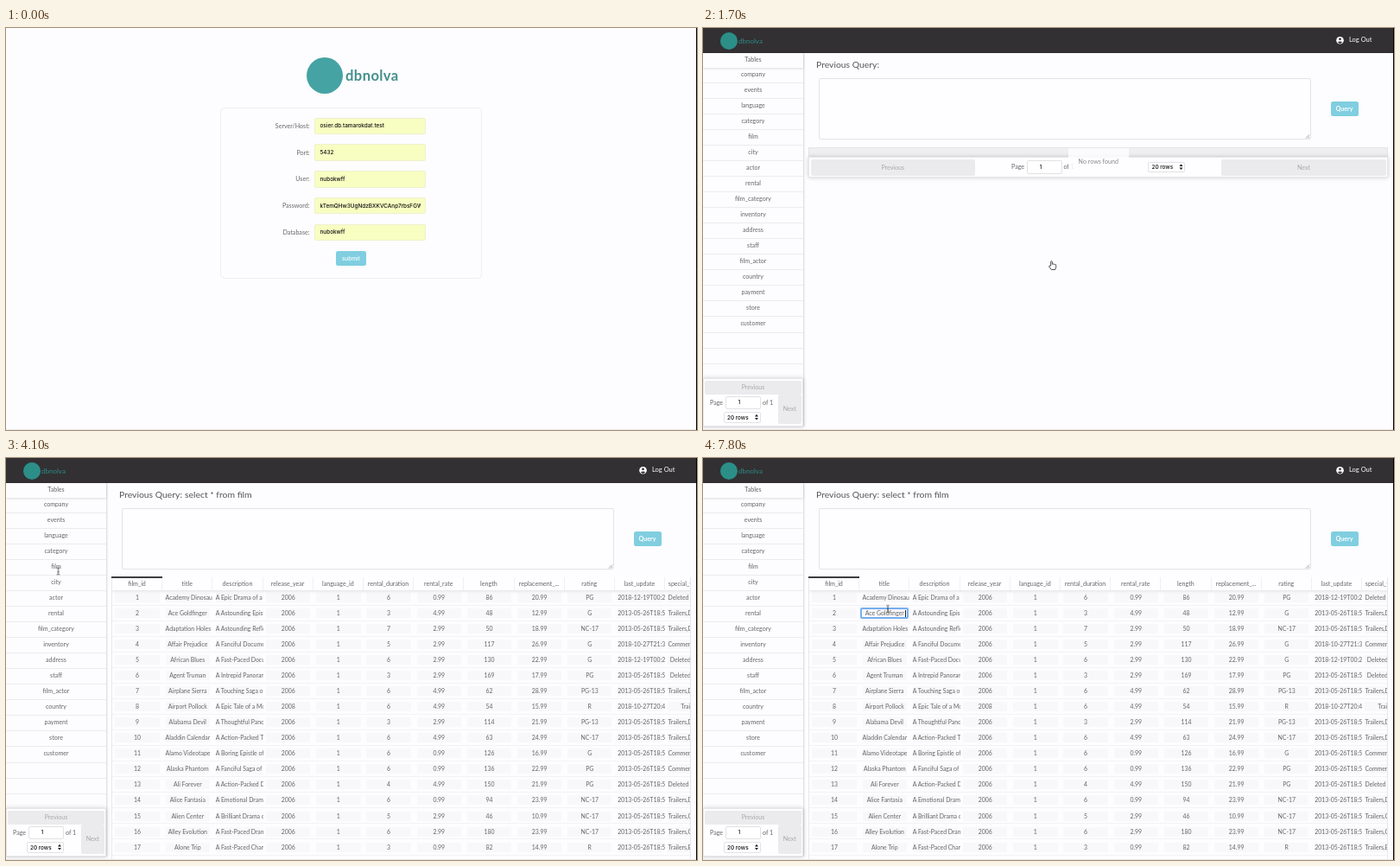
Animation of 800x465 px, one loop 8000 ms. Source, as an HTML page:

```html
<!DOCTYPE html>
<html lang="en">
<head>
<meta charset="utf-8">
<title>Database browser</title>
<style>
html, body { margin: 0; width: 100%; height: 100%; overflow: hidden; background: #fdfcfe; }
#stage { position: absolute; left: 0; top: 0; width: 800px; height: 465px; overflow: hidden; color: #666; font: 7.1px Lato, sans-serif; }
#stage div { position: absolute; box-sizing: border-box; white-space: nowrap; }
#stage .mid { text-align: center; }
#stage .right { text-align: right; }
.ui { font-family: Inter, sans-serif; font-size: 6.4px; font-weight: 500; color: #111; }
.edge { background: #000; }
.floor { background: #e8e7e9; }
.card { border: 1px solid #efeef0; border-radius: 5px; }
.field { border: 1px solid #eef1cf; border-radius: 2px; background: #f8fdc1; }
.clip { overflow: hidden; }
.button { background: #80cee0; border-radius: 2.5px; color: #fff; }
.bold { font-weight: 700; }
.teal { background: #45a3a4; border-radius: 50%; }
.name { color: #438f8c; font-size: 16.6px; font-weight: 700; letter-spacing: .4px; }
.bar { background: #323032; }
.bar .teal { background: #2b8f88; }
.bar .name { color: #2d8b85; font-size: 8px; font-weight: 400; letter-spacing: 0; }
.white { color: #fff; font-size: 7.5px; }
.query { font-size: 10.4px; color: #555; }
.area { border: 1px solid #e3e2e4; border-radius: 2px; background: #fefdff; }
.side { border: solid #e2e1e3; border-width: 0 1px 1px 0; box-shadow: 0 0 2px #0002; }
.lines { background: repeating-linear-gradient(#0000 0 17.03px, #ecebed 17.03px 18.03px); }
.head { box-shadow: 0 1px 3px #0002; }
.pager { background: #fefdff; border: 1px solid #e6e5e7; box-shadow: 0 0 5px #0003; }
.off { background: #ebeaec; border-radius: 2px; color: #a9a8aa; }
.input { background: #fff; border: 1px solid #e2e1e3; border-radius: 2px; }
.strip { background: #efeef0; border: 1px solid #e4e3e5; }
.note { background: #fefdffd9; color: #888; }
.grid { border: solid #e8e7e9; border-width: 0 1px; overflow: hidden; }
#stage .grid .row { left: 0; display: flex; width: 700px; height: 18.06px; border-bottom: 1px solid #f3f2f4; font-size: 6.9px; }
#stage .grid .row div { position: static; }
#stage .grid .cell { flex: none; width: 58.2px; padding: 3.2px 3.4px; overflow: hidden; text-align: center; }
#stage .grid .cell div { height: 11px; line-height: 11px; background: #f8f7f9; border-radius: 1px; }
#stage .grid .top { height: 15px; background: #fefdff; box-shadow: 0 1px 4px #0002; border: 0; z-index: 1; font-size: 7.1px; }
#stage .top .cell { padding: 0 3.4px; line-height: 16px; border-right: 1px solid #f0eff1; }
.sorted { background: #3d3c3e; z-index: 2; }
.ring { border: 2px solid #75aef0; border-radius: 2px; }
.caret { background: #222; }
svg { position: absolute; overflow: visible; left: 0; top: 0; }

/* 1.25% is 100 ms */
.login { animation: login 8s step-end infinite; }
.app { animation: app 8s step-end infinite; }
.empty { animation: empty 8s step-end infinite; }
.full { animation: full 8s step-end infinite; }
.ring { animation: ring 8s step-end infinite; }
.caret { animation: caret 8s step-end infinite; }
#cursor { animation: move 8s linear infinite; }
#arrow { animation: arrow 8s step-end infinite; }
#hand { animation: hand 8s step-end infinite; }
#beam { animation: beam 8s step-end infinite; }
@keyframes login { 0% { visibility: visible } 21.25%, 100% { visibility: hidden } }
@keyframes app { 0% { visibility: hidden } 21.25%, 100% { visibility: visible } }
@keyframes empty { 0% { visibility: hidden } 21.25% { visibility: visible } 51.25%, 100% { visibility: hidden } }
@keyframes full { 0% { visibility: hidden } 51.25%, 100% { visibility: visible } }
@keyframes ring { 0% { visibility: hidden } 86.25%, 100% { visibility: visible } }
@keyframes caret { 0% { visibility: hidden } 86.25% { visibility: visible } 93.75% { visibility: hidden } 97.5%, 100% { visibility: visible } }
@keyframes arrow { 0% { opacity: 0 } 1.25% { opacity: 1 } 8.75% { opacity: 0 } 30% { opacity: 1 } 42.5% { opacity: 0 } 52.5% { opacity: 1 } 55% { opacity: 0 } 100% { opacity: 0 } }
@keyframes hand { 0% { opacity: 0 } 8.75% { opacity: 1 } 30%, 100% { opacity: 0 } }
@keyframes beam { 0% { opacity: 0 } 42.5% { opacity: 1 } 52.5% { opacity: 0 } 55%, 100% { opacity: 1 } }
@keyframes move {
  0% { transform: translate(540px, 212px); animation-timing-function: steps(8) }
  10%, 28.75% { transform: translate(404px, 269px); animation-timing-function: steps(3) }
  32.5%, 35% { transform: translate(330px, 240px); animation-timing-function: steps(6) }
  42.5%, 51.25% { transform: translate(60.5px, 131px); animation-timing-function: steps(8) }
  61.25% { transform: translate(287px, 79px); animation-timing-function: steps(6) }
  68.75%, 72.5% { transform: translate(310px, 86px); animation-timing-function: steps(5) }
  78.75% { transform: translate(215px, 180px); animation-timing-function: steps(3) }
  82.5%, 100% { transform: translate(214px, 174.5px) }
}
</style>
</head>
<body>
<div id="stage"></div>
<script>
const stage = document.getElementById('stage');

function box(parent, cls, x, y, w, h, text = '') {
  const el = document.createElement('div');
  el.className = cls;
  el.textContent = text;
  el.style.cssText = `left:${x}px;top:${y}px;width:${w}px;height:${h}px;line-height:${h}px`;
  parent.append(el);
  return el;
}

function add(parent, cls, text = '') {
  const el = document.createElement('div');
  el.className = cls;
  el.textContent = text;
  parent.append(el);
  return el;
}

function shape(parent, markup) {
  parent.insertAdjacentHTML('beforeend', `<svg width="1" height="1">${markup}</svg>`);
}

function input(parent, x, y, w, h, text, pad, cls = 'input') {
  box(parent, cls, x, y, w, h);
  box(parent, 'ui clip', x + pad, y + 0.6, w - pad - 6, h, text);
}

function rowSelect(parent, x, y) {
  input(parent, x, y, 43, 12.5, '20 rows', 4.5);
  const cx = x + 38.5, cy = y + 6.2;
  shape(parent, `<path d="M${cx - 2} ${cy - 0.8}l2-2.6 2 2.6zM${cx - 2} ${cy + 0.8}l2 2.6 2-2.6z" fill="#222"/>`);
}

function buildLogin() {
  const page = box(stage, 'login', 0, 0, 800, 465);
  box(page, 'teal', 348, 34, 42, 42);
  box(page, 'name', 393, 45, 70, 20, 'dbnolva');
  box(page, 'card', 248, 91.5, 303, 198.5);
  const fields = [
    ['Server/Host:', 'osier.db.tamarokdat.test'],
    ['Port:', '5432'],
    ['User:', 'nubokwff'],
    ['Password:', 'kTemQHw3UgNdzBXKVCAnp7rbsFGWy4h'],
    ['Database:', 'nubokwff']
  ];
  fields.forEach(([label, value], i) => {
    const y = 104 + i * 30.8;
    box(page, 'right', 270, y - 0.3, 81.5, 19, label);
    input(page, 357, y - 0.5, 129, 19.5, value, 6.5, 'field');
  });
  box(page, 'button', 382, 258, 34.5, 16.5);
  box(page, 'mid ui', 382, 258.6, 34.5, 16.5, 'submit').style.color = '#fff';
}

function buildSidebar(app) {
  const names = 'company events language category film city actor rental film_category inventory address staff film_actor country payment store customer'.split(' ');
  box(app, 'side', -1, 29, 117.5, 432);
  box(app, 'head mid', 0, 29, 116, 16.5, 'Tables');
  box(app, 'lines', 0, 45.5, 116, 360);
  names.forEach((name, i) => box(app, 'mid', 0, 45 + i * 18.03, 116, 17, name));
  box(app, 'pager', 0, 405, 116, 55.5);
  box(app, 'off mid', 2, 407.5, 112, 16.5, 'Previous');
  box(app, 'off mid', 86.5, 424, 27.5, 34, 'Next');
  box(app, '', 8, 425, 20, 17, 'Page');
  input(app, 25.5, 425.5, 41, 15.5, '1', 15);
  box(app, '', 69, 425, 20, 17, 'of 1');
  rowSelect(app, 23.5, 444);
}

function buildEmpty(app) {
  const view = box(app, 'empty', 0, 0, 800, 465);
  box(view, 'strip', 122, 137.5, 671, 12);
  box(view, 'pager', 122, 149, 671, 23.5);
  box(view, 'off mid', 125, 151.5, 189.5, 19, 'Previous');
  box(view, 'off mid', 600, 151.5, 191, 19, 'Next');
  box(view, '', 357, 152, 20, 18, 'Page');
  input(view, 374.5, 153, 41, 15.5, '1', 15);
  box(view, '', 417.5, 152, 20, 18, 'of 1');
  rowSelect(view, 515, 154.5);
  box(view, 'note mid', 423, 138.5, 69.5, 32, 'No rows found');
}

function buildResults(app) {
  const view = box(app, 'full', 0, 0, 800, 465);
  box(view, 'query', 207, 34, 120, 16, 'select * from film');
  const grid = box(view, 'grid', 122, 137.5, 671, 326.5);

  const addRow = (y, values, header) => {
    const row = add(grid, header ? 'row top' : 'row');
    row.style.top = y + 'px';
    values.forEach(v => {
      const cell = add(row, 'cell', header ? v : '');
      if (!header) add(cell, '', v);
    });
  };

  const heads = 'film_id title description release_year language_id rental_duration rental_rate length replacement_... rating last_update special_features';
  addRow(0, heads.split(' '), true);

  const extras = {
    T: 'Trailers', D: 'Deleted Scenes', TD: 'Trailers,Deleted Scenes', TC: 'Trailers,Commentaries',
    TB: 'Trailers,Behind the Scenes', C: 'Commentaries,Deleted Scenes', DB: 'Deleted Scenes,Behind the Scenes'
  };
  const changed = { 1: '2018-12-19T00:22:10', 4: '2018-10-27T21:31:40', 5: '2018-12-19T00:22:30', 8: '2018-10-27T20:45:20' };
  // title | description | duration rate length cost rating extras
  const films = `Academy Dinosaur|A Epic Drama of a Writer|6 0.99 86 20.99 PG DB
Ace Goldfinger|A Astounding Epistle of|3 4.99 48 12.99 G TD
Adaptation Holes|A Astounding Reflection|7 2.99 50 18.99 NC-17 TD
Affair Prejudice|A Fanciful Documentary|5 2.99 117 26.99 G C
African Blues|A Fast-Paced Documentary|6 2.99 130 22.99 G D
Agent Truman|A Intrepid Panorama of|3 2.99 169 17.99 PG D
Airplane Sierra|A Touching Saga of a|6 4.99 62 28.99 PG-13 TD
Airport Pollock|A Epic Tale of a Moose|6 4.99 54 15.99 R T
Alabama Devil|A Thoughtful Panorama|3 2.99 114 21.99 PG-13 TD
Aladdin Calendar|A Action-Packed Tale|6 4.99 63 24.99 NC-17 TD
Alamo Videotape|A Boring Epistle of a|6 0.99 126 16.99 G C
Alaska Phantom|A Fanciful Saga of a|6 0.99 136 22.99 PG C
Ali Forever|A Action-Packed Drama|4 4.99 150 21.99 PG DB
Alice Fantasia|A Emotional Drama of|6 0.99 94 23.99 NC-17 TD
Alien Center|A Brilliant Drama of a|5 2.99 46 10.99 NC-17 TC
Alley Evolution|A Fast-Paced Drama of|6 2.99 180 23.99 NC-17 TC
Alone Trip|A Fast-Paced Character|3 0.99 82 14.99 R TB`;
  films.split('\n').forEach((line, i) => {
    const id = i + 1;
    const [title, text, rest] = line.split('|');
    const [days, rate, length, cost, rating, extra] = rest.split(' ');
    addRow(15 + i * 18.06, [id, title, text, id === 8 ? 2008 : 2006, 1, days, rate, length, cost, rating,
      changed[id] || '2013-05-26T18:50:58', extras[extra]]);
  });
  box(view, 'sorted', 122, 137, 58.5, 2);
  box(view, 'ring', 181.5, 173, 56.5, 13);
  box(view, 'caret', 233.5, 175.5, 0.7, 8);
}

function buildApp() {
  const app = box(stage, 'app', 0, 0, 800, 465);
  const bar = box(app, 'bar', 0, 0, 800, 29);
  box(bar, 'teal', 20, 4.5, 20, 20);
  box(bar, 'name', 41, 8, 40, 14, 'dbnolva');
  shape(bar, '<circle cx="737.5" cy="14.3" r="4.3" fill="#fff"/><circle cx="737.5" cy="12.8" r="1.4" fill="#323032"/><path d="M734.8 16.6q2.7-2.4 5.4 0q-2.7 2.8-5.4 0" fill="#323032"/>');
  box(bar, 'white', 748, 6, 40, 16, 'Log Out');
  buildSidebar(app);
  box(app, 'query', 131, 34, 90, 16, 'Previous Query:');
  box(app, 'area', 133.5, 58, 570, 71);
  shape(app, '<path d="M698 127.5l4-4M700.5 127.5l1.5-1.5" stroke="#777" stroke-width=".7"/>');
  box(app, 'button mid bold', 726.5, 85, 32, 17, 'Query');
  buildEmpty(app);
  buildResults(app);
}

buildLogin();
buildApp();
box(stage, 'floor', 0, 464, 800, 1);
box(stage, 'edge', 799, 0, 1, 465);
shape(stage, `<g id="cursor">
  <path id="arrow" d="M0 0v9l2.1-1.9 1.4 3.2 1.4-.6-1.4-3.1h2.9z" fill="#111" stroke="#fff" stroke-width=".7"/>
  <path id="hand" d="M-1.3 6V1.2q.8-1.4 1.6 0v3q1-.7 1.6.1q1-.5 1.5.3q1.2-.4 1.3.8v2.3l-1 2.8h-4.4l-2.7-3.6q.3-1.5 2.1-.9z" fill="#fff" stroke="#222" stroke-width=".8"/>
  <path id="beam" d="M-1.7-4q1.3 0 1.7.8q.4-.8 1.7-.8M0-3.2v6.4M-1.7 4q1.3 0 1.7-.8q.4.8 1.7.8M-.8.8h1.6" fill="none" stroke="#333" stroke-width=".8"/>
</g>`);
</script>
</body>
</html>
```
